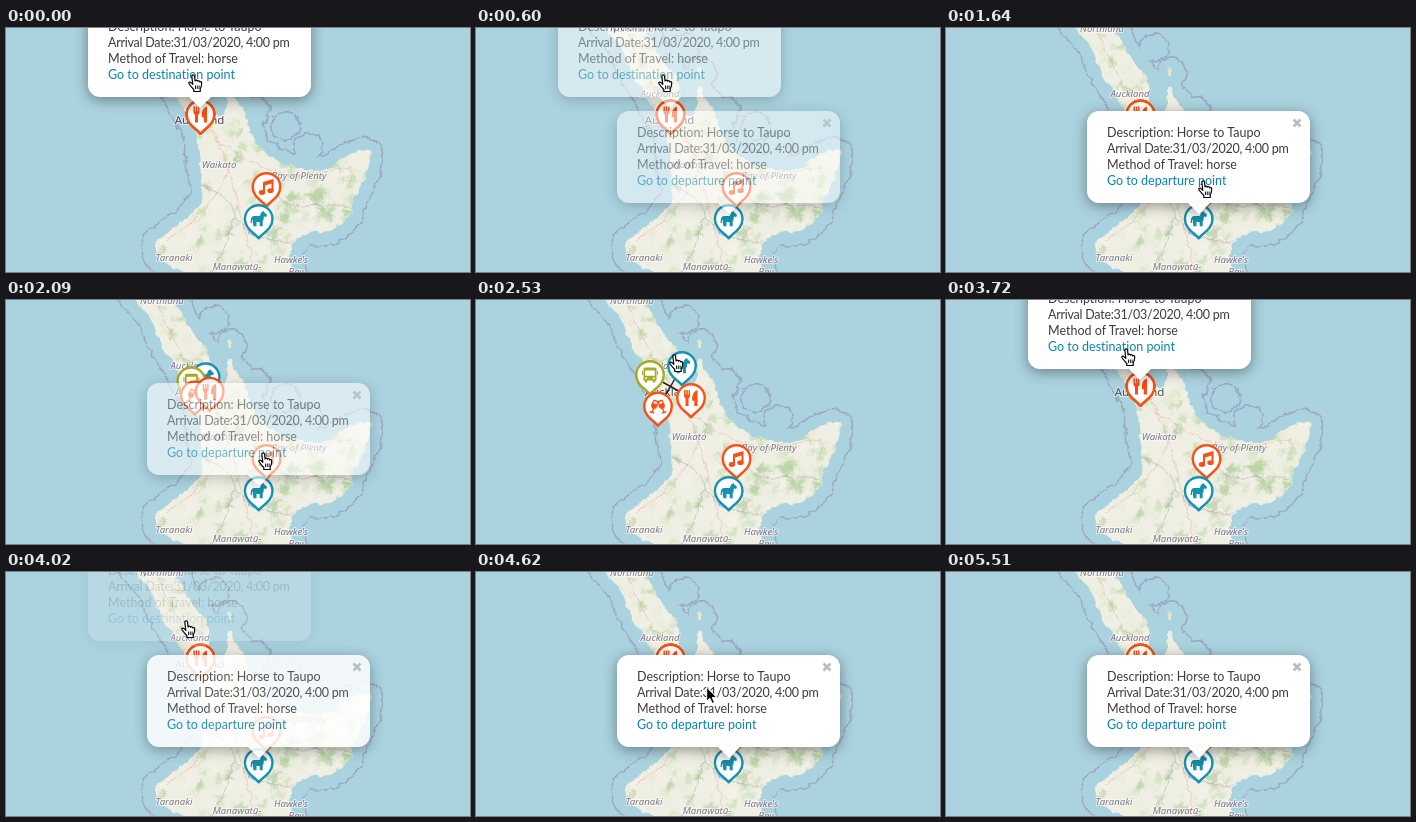
Write an HTML page that moves like this. It is 464 px wide and 244 px high and loops after 6110 ms.

```html
<!DOCTYPE html>
<html lang="en">
<head>
<meta charset="utf-8">
<title>Travel map</title>
<style>
  html, body { margin: 0; width: 100%; height: 100%; overflow: hidden; background: #aad3df; }
  svg { display: block; width: 464px; height: 244px; }
  .label { font: italic 9.6px "Noto Sans", sans-serif; fill: #7d7488; text-anchor: middle;
           paint-order: stroke; stroke: #fff; stroke-opacity: .6; stroke-width: 2px; stroke-linejoin: round; }
  .city { font-style: normal; font-size: 11.5px; fill: #4a4a4a; }
  .popup { filter: drop-shadow(0 3px 7px rgba(0, 0, 0, .4)); }
  .popup text { font: 12.5px Lato, sans-serif; fill: #3c3c3c; font-variant-ligatures: none; }
  .popup .date { letter-spacing: -.25px; }
  .popup .link { fill: #0d82b0; }
  .soft { fill: none; stroke-linejoin: round; }
</style>
</head>
<body>
<svg viewBox="0 0 464 244" xmlns="http://www.w3.org/2000/svg">
  <defs>
    <filter id="rough" x="-5%" y="-5%" width="110%" height="110%">
      <feTurbulence type="fractalNoise" baseFrequency=".11" numOctaves="3" seed="4"/>
      <feDisplacementMap in="SourceGraphic" scale="7" xChannelSelector="R" yChannelSelector="G"/>
    </filter>
    <filter id="mottle" x="-10%" y="-10%" width="120%" height="120%">
      <feGaussianBlur stdDeviation="1.4" result="b"/>
      <feTurbulence type="fractalNoise" baseFrequency=".15" numOctaves="3" seed="9"/>
      <feDisplacementMap in="b" scale="14" xChannelSelector="R" yChannelSelector="G"/>
    </filter>
    <clipPath id="shore"><path id="shoreShape"/></clipPath>
  </defs>
  <rect width="464" height="244" fill="#aad3df"/>
  <g id="waters" filter="url(#rough)"></g>
  <g id="land" filter="url(#rough)"></g>
  <g id="labels"></g>
  <g id="legs" stroke="#222" stroke-width="1.5"></g>
  <g id="pins"></g>
  <g id="popups"></g>
  <g id="cursor" stroke-linejoin="round">
    <g id="hand">
      <path fill="#fff" stroke="#000" stroke-width="1.2" d="M3.8 2C3.8 .6 6.2 .4 6.5 2L7.1 7C7.5 5.8 9.3 6 9.5 7.2 10 6.3 11.5 6.7 11.7 7.900 12.3 7.200 13.700 7.600 13.700 8.800 13.800 11.500 13.200 13.500 12.200 15V17.500H5.800V15.500C4 13.600 2.200 11.700 1 9.800 .2 8.500 1.700 7.400 3 8.600L4.800 10.300Z"/>
      <path stroke="#000" stroke-width=".9" d="M7.500 11.500V15M9.300 11.500V15M11.100 11.500V15"/>
    </g>
    <path id="arrow" fill="#000" stroke="#fff" d="M.5 .5V14.500L3.700 11.500 6 16.700 8.300 15.700 6 10.700H10.500Z"/>
  </g>
</svg>
<script>
const LOOP = 6110, TICK = 148.6, FADE = 180;
const $ = id => document.getElementById(id);

function add(parent, tag, attrs = {}, text = "") {
  const node = document.createElementNS("http://www.w3.org/2000/svg", tag);
  for (const key in attrs) node.setAttribute(key, attrs[key]);
  node.textContent = text;
  return parent.appendChild(node);
}

// Smooth closed curve through the points
function loopCurve(pts) {
  const n = pts.length, get = i => pts[(i + n) % n];
  return "M" + pts[0] + pts.map((b, i) => {
    const a = get(i - 1), c = get(i + 1), e = get(i + 2);
    const p = b.map((v, k) => v + (c[k] - a[k]) / 6);
    const q = c.map((v, k) => v - (e[k] - b[k]) / 6);
    return `C${p} ${q} ${c}`;
  }).join("");
}

function seeded(seed) {
  return () => (seed = (seed * 16807) % 2147483647) / 2147483647;
}

// Map
const coast = [
  [122, -12], [144, 18], [155, 44], [174, 76], [190, 106], [194, 140], [197, 166],
  [184, 188], [162, 204], [149, 217], [156, 234], [182, 247], [200, 275], [285, 275],
  [284, 224], [301, 206], [323, 204], [342, 190], [347, 174], [362, 140], [363, 124],
  [345, 126], [318, 142], [284, 138], [252, 119], [238, 84], [221, 58], [219, 86],
  [204, 80], [202, 53], [186, 32], [172, 6], [168, -12]
];
const islands = [[208, 20], [226, 44], [250, 82], [279, 98], [302, 119]];
const shoreline = loopCurve(coast);
$("shoreShape").setAttribute("d", shoreline);

// Coastal limit: a fixed distance from every shore
for (const [color, reach] of [["#9ba5c2", 14], ["#aad3df", 12.6]]) {
  add($("waters"), "path", { d: shoreline, stroke: color, "stroke-width": reach * 2, class: "soft" });
  for (const [cx, cy] of islands) add($("waters"), "circle", { cx, cy, r: reach + 1, fill: color });
}

const land = $("land");
add(land, "path", { d: shoreline, fill: "#f0efe4" });
add(land, "ellipse", { cx: 224, cy: 43, rx: 2, ry: 5, fill: "#dfe9cf" });
const inland = add(land, "g", { "clip-path": "url(#shore)" });
const terrain = add(inland, "g", { filter: "url(#mottle)" });

// Scattered vegetation, denser towards the eastern ranges
const rand = seeded(71);
for (let i = 0; i < 620; i++) {
  const cx = 115 + rand() * 255, cy = rand() * 250, r = 1.5 + rand() * 4;
  const range = Math.exp(-(((cx - 300) / 55) ** 2) - ((cy - 175) / 40) ** 2);
  const wooded = rand() < .28 + .5 * range;
  const fill = wooded ? ["#b9d5a3", "#c6ddb1", "#a9cb97"][i % 3] : ["#f3f0e8", "#e6ecd6"][i % 2];
  add(terrain, "circle", { cx, cy, r, fill, opacity: .75 });
}
add(inland, "ellipse", { cx: 249, cy: 203, rx: 7, ry: 5, fill: "#aad3df" });
for (const d of ["M150 0Q168 45 192 80T222 140T250 244", "M208 112Q240 130 263 142T345 138", "M222 140Q212 180 160 212", "M240 178Q270 200 290 222"])
  add(inland, "path", { d, class: "soft", stroke: "#e8b4a4", opacity: .6 });
for (const d of ["M196 158Q230 170 228 190T205 244", "M270 140Q262 180 300 178T345 178", "M228 190Q262 222 290 212"])
  add(inland, "path", { d, class: "soft", stroke: "#a998b4", opacity: .5 });

const places = [
  ["Northland", 156, 4], ["Auckland", 184, 69], ["Waikato", 213, 140],
  ["Bay of Plenty", 293, 151], ["Taranaki", 168, 233], ["Manawatū-", 231, 242],
  ["Hawke's", 285, 235], ["Bay", 290, 247], ["Auckland", 193.5, 96, "city"]
];
for (const [name, x, y, extra = ""] of places)
  add($("labels"), "text", { x, y, class: "label " + extra }, name);

// Pins
const TEAL = "#1692b0", ORANGE = "#fa5014", OLIVE = "#a9ab1f";
const icons = {
  horse: c => `<path fill="${c}" d="M-8 2C-8-1.500-6.500-3-4.500-3H1L2.500-6.500 5-8 5.500-6.800 8.300-4.200 7.500-2 5.200-2.400 4.800 1 4 2.200V7.200H1V3.200L-2.200 2.700V7.200H-5.300L-5.800 3.500V.5L-6.600 1.500V4H-8Z"/>`,
  food: c => `<path fill="${c}" d="M-7-8H-5.600V-3.200H-4.800V-8H-3.200V-3.200H-2.400V-8H-1V-2.500Q-1-.5-2.500 .3V8H-5.500V.3Q-7-.5-7-2.500ZM6.500-8V8H3.300V2.700H1.200Q.7-6.500 6.500-8Z"/>`,
  music: c => `<path fill="${c}" d="M-3.500-5L7-8V4H5V-3.500L-1.500-1.600V6H-3.500Z"/><ellipse cx="-4.500" cy="5.500" rx="3.200" ry="2.400" fill="${c}"/><ellipse cx="4" cy="3.700" rx="3.200" ry="2.400" fill="${c}"/>`,
  bus: c => `<path fill="${c}" d="M-5-7.500H5Q6.500-7.500 6.500-6V5.500H5.300V7.500H2.800V5.500H-2.800V7.500H-5.300V5.500H-6.500V-6Q-6.500-7.500-5-7.500ZM-8-4H-7V0H-8ZM7-4H8V0H7Z"/><path fill="#fff" d="M-4.800-4.500H4.800V.8H-4.800ZM-4.800 2.500H-3V4H-4.800ZM3 2.500H4.800V4H3Z"/>`,
  cheers: c => [1, -1].map(s => `<g transform="scale(${s} 1) rotate(-18 4 0)"><path fill="${c}" d="M1.500-6.500H6.500L7.200-1Q7 2 4.700 2.300V5.500H6.500V7H1.700V5.500H3.300V2.300Q1 2 .8-1Z"/><path fill="#fff" d="M2.500-5H5.500L5.700-3H2.300Z"/></g>`).join("")
};

function makePin(icon, color) {
  const pin = add($("pins"), "g");
  pin.innerHTML = `<path fill="#fff" stroke="${color}" stroke-width="2.4" stroke-linejoin="round"
    d="M0 19.3C-3 14.5-13.8 10.5-13.8 0A13.8 13.8 0 0 1 13.8 0C13.8 10.5 3 14.5 0 19.3Z"/>` + icons[icon](color);
  return pin;
}
const place = (node, x, y) => node.setAttribute("transform", `translate(${x} ${y})`);

const HUB = [194.5, 86.5];
const spider = [
  ["horse", TEAL, 11.5, -20.5], ["bus", OLIVE, -20.5, -11.5],
  ["cheers", ORANGE, -12.5, 20], ["food", ORANGE, 20.5, 11.5]
].map(([icon, color, dx, dy]) => ({
  dx, dy, pin: makePin(icon, color),
  leg: add($("legs"), "line", { x1: HUB[0], y1: HUB[1] })
}));
place(makePin("music", ORANGE), 260.5, 159);
place(makePin("horse", TEAL), 252.7, 191);

// Popups
function makePopup(x, y, goal) {
  const box = add($("popups"), "g", { class: "popup", transform: `translate(${x} ${y})` });
  add(box, "path", { fill: "#fff", d: "M12 0H211A12 12 0 0 1 223 12V80A12 12 0 0 1 211 92H123L112 103 101 92H12A12 12 0 0 1 0 80V12A12 12 0 0 1 12 0Z" });
  [["Description: Horse to Taupo"], ["Arrival Date:31/03/2020, 4:00 pm", "date"],
   ["Method of Travel: horse"], [`Go to ${goal} point`, "link"]].forEach(([line, kind = ""], i) =>
    add(box, "text", { x: 20, y: 26 + 16 * i, class: kind }, line));
  add(box, "path", { d: "M206.5 8.5L213.5 15.5M213.5 8.5L206.5 15.5", stroke: "#bcbcbc", "stroke-width": 2.6 });
  return box;
}
const departure = makePopup(82, -23, "destination");
const arrival = makePopup(141, 83, "departure");

// Motion
const ramp = (t, start) => Math.min(1, Math.max(0, (t - start) / FADE));
const between = (t, on, off) => ramp(t, on) - ramp(t, off);

// Resting points of the pointer: time, left, top
const stops = [
  [0, 182, 46], [900, 182, 46], [1634, 252, 152], [2090, 252, 152], [2526, 193, 54],
  [3269, 211, 62], [3715, 175, 48], [4170, 175, 48], [4903, 261, 152], [5210, 262, 153],
  [5349, 379, 215], [LOOP, 379, 215]
];
function pointerAt(t) {
  const i = stops.findIndex(stop => stop[0] > t);
  const [t0, x0, y0] = stops[i - 1], [t1, x1, y1] = stops[i];
  const u = (t - t0) / (t1 - t0), e = u * u * (3 - 2 * u);
  return [x0 + (x1 - x0) * e, y0 + (y1 - y0) * e];
}

function draw() {
  const t = Math.floor(performance.now() % LOOP / TICK) * TICK;
  const out = 1 - ramp(t, 505) + between(t, 3125, 3860);
  const back = between(t, 505, 2000) + ramp(t, 3860);
  const spread = between(t, 2000, 2890);
  departure.style.opacity = out;
  arrival.style.opacity = back;
  $("legs").style.display = spread ? "" : "none";
  for (const { dx, dy, pin, leg } of spider) {
    const x = HUB[0] + dx * spread, y = HUB[1] + dy * spread;
    place(pin, x, y);
    leg.setAttribute("x2", x);
    leg.setAttribute("y2", y);
  }
  const [x, y] = pointerAt(t);
  const overText = (back > .9 && y > 85 && y < 145) || (out > .5 && y > 57) || y > 200;
  place($("cursor"), x, y);
  $("cursor").style.display = t < 5490 ? "" : "none";
  $("hand").style.display = overText ? "none" : "";
  $("arrow").style.display = overText ? "" : "none";
  requestAnimationFrame(draw);
}
draw();
</script>
</body>
</html>
```
